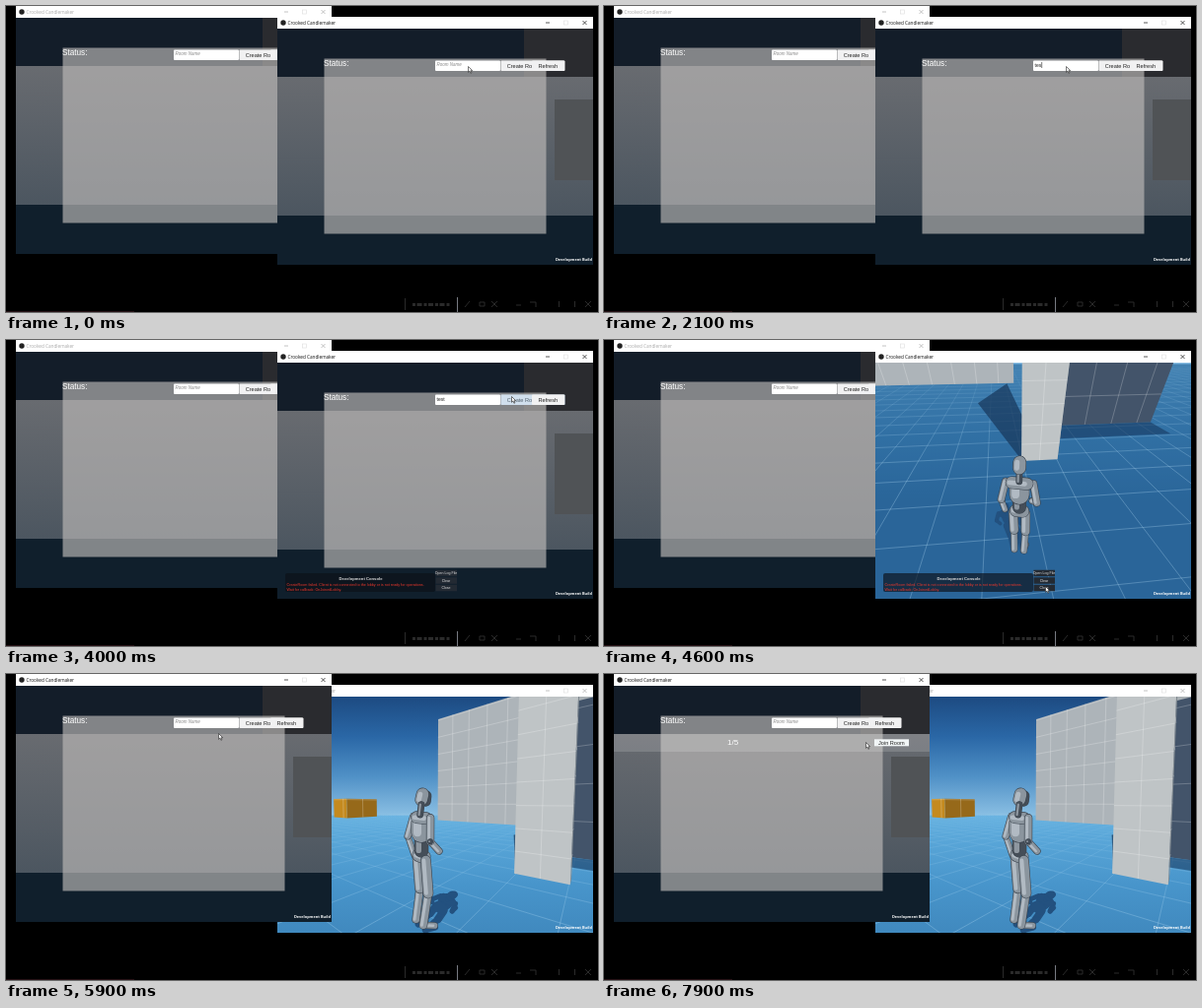
Write an HTML page with a canvas that moves like this. It is 600 px wide and 311 px high and loops after 8 s.

```html
<!DOCTYPE html>
<html lang="en">
<head>
<meta charset="utf-8">
<title>Lobby demo</title>
<style>
  html, body { margin: 0; width: 100%; height: 100%; overflow: hidden; background: #000; }
  #stage { position: relative; width: 600px; height: 311px; overflow: hidden; background: #000; }
  #stage > *, .win > * { position: absolute; left: 0; top: 0; }
  .win { width: 320px; height: 252px; overflow: hidden; color: #111; }
  .win.idle { color: #aaa; }
  #left { left: 10px; top: 0; z-index: 1; }
  #right { left: 275px; top: 11px; z-index: 2; }
  #scene { top: 12px; }
  #cursor { z-index: 9; }
  svg { display: block; }
  text { font-family: "Liberation Sans", Arial, sans-serif; }
  .title { font: 4.7px "Open Sans", sans-serif; fill: currentColor; }
  .build { font: bold 3.9px "Open Sans", sans-serif; fill: #fff; }
  .label { font-size: 5.6px; fill: #222; }
  .hint { font-size: 4.5px; font-style: italic; fill: #888; }
</style>
</head>
<body>
<div id="stage">
  <svg width="600" height="311" fill="none" stroke="#2a2a2a">
    <path d="M404.5 297V309"/>
    <path d="M457.5 296V311" stroke="#777b82"/>
    <path d="M412 303.5H451" stroke-width="3" stroke-dasharray="3 1.5 5 2"/>
    <path d="M465 306l5-6M480 301h5v4h-5zM492 300l6 6M498 300l-6 6M517 304h5M531 301h6v5M560.5 300v6M576.5 300v6M587 300l6 6M593 300l-6 6"/>
    <path d="M0 310.5H130" stroke="#241014"/>
  </svg>

  <div id="left" class="win">
    <svg width="320" height="252">
      <defs>
        <linearGradient id="mid" x2="0" y2="1">
          <stop stop-color="#686b70"/><stop offset="1" stop-color="#4c5660"/>
        </linearGradient>
        <g id="bar">
          <rect width="320" height="12" fill="#fff"/>
          <circle cx="6" cy="6" r="2.7" fill="#222"/>
          <text class="title" x="10.5" y="7.7">Crooked Candlemaker</text>
          <path d="M272 6h4M309.500 4l4 4M313.500 4l-4 4" stroke="currentColor" stroke-width=".7"/>
          <rect x="290.500" y="4" width="4" height="4" fill="none" stroke="#ddd" stroke-width=".6"/>
        </g>
        <g id="lobby">
          <rect y="12" width="320" height="49" fill="#131d29"/>
          <rect x="250" y="12" width="70" height="49" fill="#2a2b2f"/>
          <rect y="61" width="320" height="141" fill="url(#mid)"/>
          <rect x="281" y="84" width="39" height="82" fill="#505356"/>
          <rect y="202" width="320" height="50" fill="#101f2c"/>
          <rect x="47.500" y="42.500" width="225" height="178" fill="#bdbab8" fill-opacity=".66"/>
          <text x="47" y="49.500" font-size="8.200" fill="#fff">Status:</text>
          <rect x="160" y="44.500" width="66" height="10.500" rx="1" fill="#fff"/>
        </g>
        <g id="create">
          <rect x="226.500" y="44.500" width="65" height="10.500" rx="1" fill="#f1f1f2"/>
          <text class="label" x="232.700" y="51.800">Create Room</text>
        </g>
        <g id="refresh">
          <rect x="258" y="44.500" width="33" height="10.500" rx="1" fill="#f1f1f2"/>
          <text class="label" x="264.500" y="51.800">Refresh</text>
        </g>
      </defs>
      <use href="#bar"/>
      <use href="#lobby"/>
      <text class="hint" x="161.500" y="50.200">Room Name</text>
      <use href="#create"/>
      <use href="#refresh"/>
      <rect id="hoverRefresh" x="258" y="44.500" width="33" height="10.500" fill="#234" opacity=".1"/>
      <g id="room">
        <rect y="61" width="320" height="18" fill="#fff" opacity=".15"/>
        <text x="115" y="71.700" font-size="8" fill="#fff">1/5</text>
        <rect x="264" y="66.300" width="35" height="7" fill="#f2f6f7"/>
        <text class="label" x="268" y="71.700">Join Room</text>
      </g>
      <text class="build" x="319" y="248.300" text-anchor="end">Development Build</text>
    </svg>
  </div>

  <div id="right" class="win">
    <canvas id="scene" width="320" height="240"></canvas>
    <svg width="320" height="252">
      <g id="form">
        <use href="#lobby"/>
        <text id="hint" class="hint" x="161.500" y="50.200">Room Name</text>
        <text id="typed" x="161.500" y="50.600" font-size="5" fill="#222"></text>
        <path id="caret" d="M168.700 46v6" stroke="#222" stroke-width=".6"/>
        <use href="#create"/>
        <rect id="hoverCreate" x="226.500" y="44.500" width="65" height="10.500" fill="#9fc4e4" opacity=".4"/>
        <use href="#refresh"/>
      </g>
      <g id="console">
        <rect x="8" y="226" width="152" height="19" rx="2" fill="#0c1018" opacity=".65"/>
        <text x="62.500" y="232.500" font-size="4.200" font-weight="bold" fill="#ddd">Development Console</text>
        <g font-size="3.700" fill="#f0382c">
          <text x="9.500" y="239.200">CreateRoom failed. Client is not connected to the lobby or is not ready for operations.</text>
          <text x="9.500" y="243.700">Wait for callback: OnJoinedLobby.</text>
        </g>
        <g font-size="3.600" fill="#e4e4e4" text-anchor="middle">
          <path d="M160.500 226H182M160.500 233.500H182M160.500 241H182" stroke="#232a33" stroke-width="6.500"/>
          <text x="171" y="227.300">Open Log File</text>
          <text x="171" y="234.800">Clear</text>
          <text x="171" y="242.300">Close</text>
        </g>
      </g>
      <use href="#bar"/>
      <text class="build" x="319" y="248.300" text-anchor="end">Development Build</text>
    </svg>
  </div>

  <svg id="cursor" width="8" height="10">
    <path d="M.5 .5V6.300L1.900 5L2.900 7.300L3.900 6.900L2.900 4.700H4.700Z" fill="#fff" stroke="#222" stroke-width=".6"/>
  </svg>
</div>

<script>
const LOOP = 8000, FOCAL = 208, NEAR = .3, TURN = .25;
const $ = id => document.getElementById(id);
const ctx = $('scene').getContext('2d');
const show = (id, on) => { $(id).style.display = on ? '' : 'none'; };
const mix = (a, b, k) => a + (b - a) * k;
const ease = (t, from, to) => {
  const u = Math.min(1, Math.max(0, (t - from) / (to - from)));
  return u * u * (3 - 2 * u);
};

// Orbit camera around the robot, in metres: x right, y up, z ahead.
let cam;
function aim(yaw, pitch) {
  cam = {
    sy: Math.sin(yaw), cy: Math.cos(yaw), sp: Math.sin(pitch), cp: Math.cos(pitch),
    back: 2.6 * Math.cos(pitch), height: 1.5 + 2.6 * Math.sin(pitch)
  };
}

function toCamera([x, y, z]) {
  const ahead = z * cam.cy - x * cam.sy + cam.back, down = cam.height - y;
  return [x * cam.cy + z * cam.sy, down * cam.cp - ahead * cam.sp, ahead * cam.cp + down * cam.sp];
}

function project(point) {
  const [x, y, depth] = toCamera(point), s = FOCAL / Math.max(depth, NEAR);
  return [421 + x * s, 143 + y * s, s];
}

function trace(points) {
  ctx.beginPath();
  points.forEach(p => ctx.lineTo(...project(p).slice(0, 2)));
}

function poly(fill, points) {
  trace(points);
  ctx.fillStyle = fill;
  ctx.fill();
}

function gradient(y0, y1, ...colours) {
  const g = ctx.createLinearGradient(0, y0, 0, y1);
  colours.forEach((c, i) => g.addColorStop(i / (colours.length - 1), c));
  return g;
}

// Upright tiled wall from (x0, z0) to (x1, z1).
function wall(fill, tile, x0, z0, x1, z1, top, bottom = 0) {
  const at = (k, y) => [mix(x0, x1, k), y, mix(z0, z1, k)];
  const step = tile / Math.hypot(x1 - x0, z1 - z0);
  poly(fill, [at(0, bottom), at(1, bottom), at(1, top), at(0, top)]);
  ctx.strokeStyle = 'rgba(255,255,255,.32)';
  ctx.lineWidth = .7;
  for (let k = step; k < .99; k += step) { trace([at(k, bottom), at(k, top)]); ctx.stroke(); }
  for (let y = bottom + tile; y < top; y += tile) { trace([at(0, y), at(1, y)]); ctx.stroke(); }
}

function floorPatch(fill, x0, z0, x1, z1) {
  poly(fill, [[x0, 0, z0], [x1, 0, z0], [x1, 0, z1], [x0, 0, z1]]);
}

function gridLine(a, b) {
  const da = toCamera(a)[2], db = toCamera(b)[2];
  if (da < NEAR && db < NEAR) return;
  const k = (NEAR - da) / (db - da), cut = a.map((v, i) => mix(v, b[i], k));
  ctx.moveTo(...project(da < NEAR ? cut : a).slice(0, 2));
  ctx.lineTo(...project(db < NEAR ? cut : b).slice(0, 2));
}

function ground(dim) {
  const far = 27 - cam.back;
  const edge = project([-far * cam.sy, 0, far * cam.cy])[1];
  ctx.fillStyle = gradient(edge - 120, edge, '#1d4b82', '#2a67a6', '#4f90c6', '#8abfe3');
  ctx.fillRect(275, 23, 320, 240);
  ctx.fillStyle = gradient(edge, edge + 140, '#62afdf', '#4895cb', '#3d84b9');
  ctx.fillRect(275, edge, 320, 300);
  ctx.fillStyle = `rgba(8,44,92,${dim})`;
  ctx.fillRect(275, edge, 320, 300);

  ctx.beginPath();
  for (let i = -20; i <= 20; i++) {
    gridLine([i + .4, 0, -20], [i + .4, 0, 20]);
    gridLine([-20, 0, i + .3], [20, 0, i + .3]);
  }
  ctx.strokeStyle = gradient(edge, edge + 110, 'rgba(180,220,245,.05)', 'rgba(180,220,245,.38)');
  ctx.lineWidth = .8;
  ctx.stroke();
}

function buildings() {
  wall('#96691a', 2, -18.3, 10, -18.3, 14, 2.1);
  wall('#c48a1f', 2, -21, 10, -18.3, 10, 2.1);
  wall('#adb4b9', 1.55, -9.4, 14.1, 1, 14.1, 9.4);
  poly('rgba(24,56,92,.72)', [[.36, 0, 3.1], [-1.26, 0, 9.1], [.5, 0, 14], [1, 0, 3.1]]);
  floorPatch('rgba(20,52,90,.55)', 1.2, 4.4, 6, 5.6);
  wall('#43546a', 1.1, 1, 5.6, 6, 5.6, 9);
  wall('#a9b0b4', .55, 1.42, 3, 3, 3, 9, 3.6);
  wall('#7f888f', .55, 1.42, 3, 1.42, 3.4, 9);
  wall('#bfc4c6', .53, .36, 3, 1.42, 3, 9);
}

// The robot is a set of capsules: [from, to, width, colour].
function buildRobot() {
  const metal = '#8b959e', dark = '#454e58', parts = [];
  const add = (a, b, width, colour = metal) => parts.push([a, b, width, colour]);
  for (const s of [-1, 1]) {
    const hip = [s * .09, .93, 0], knee = [s * .09, .5, .04], ankle = [s * .08, .1, -.03];
    const shoulder = [s * .18, 1.47, 0], elbow = [s * .24, 1.2, -.05];
    const hand = s < 0 ? [-.22, .93, .04] : [.16, 1.04, .16];
    add(hip, knee, .12);
    add(knee, ankle, .095);
    add(ankle, [s * .1, .04, .14], .075);
    add(shoulder, elbow, .085);
    add(elbow, hand, .07);
    add(knee, knee, .06, dark);
    add(elbow, elbow, .055, dark);
  }
  add([0, 1.22, 0], [0, 1.04, 0], .17, dark);
  add([0, 1.4, 0], [0, 1.27, 0], .25);
  add([-.1, 1.46, 0], [.1, 1.46, 0], .15);
  add([-.05, .97, 0], [.05, .97, 0], .17);
  add([0, 1.5, -.02], [0, 1.63, 0], .07, dark);
  add([0, 1.69, 0], [0, 1.76, .02], .15);
  add([0, 1.67, .07], [0, 1.74, .08], .12, dark);

  const sin = Math.sin(TURN), cos = Math.cos(TURN);
  const turn = ([x, y, z]) => [x * cos + z * sin, y, z * cos - x * sin];
  return parts.map(([a, b, ...look]) => [turn(a), turn(b), ...look]);
}
const robot = buildRobot();

function stroke(a, b, width, colour, shift = 0) {
  const [ax, ay, s] = project(a), [bx, by] = project(b);
  ctx.beginPath();
  ctx.moveTo(ax + shift * s, ay);
  ctx.lineTo(bx + shift * s, by + .01);
  ctx.lineWidth = width * s;
  ctx.strokeStyle = colour;
  ctx.stroke();
}

function drawRobot() {
  ctx.lineCap = 'round';
  const fall = ([x, y, z]) => [x - y * .11, 0, z + y * .62];
  robot.forEach(([a, b, width]) => stroke(fall(a), fall(b), width, '#23517f'));

  const depth = ([a, b]) => toCamera(a)[2] + toCamera(b)[2];
  [...robot].sort((p, q) => depth(q) - depth(p)).forEach(([a, b, width, colour]) => {
    stroke(a, b, width + .014, '#39424c');
    stroke(a, b, width, colour);
    if (a !== b) stroke(a, b, width * .4, 'rgba(215,224,231,.5)', -width * .2);
  });
  ctx.lineCap = 'butt';
}

function drawScene(t) {
  const swing = ease(t, 4700, 5300), settle = ease(t, 5300, 5700);
  ctx.setTransform(1, 0, 0, 1, -275, -23);
  aim(-.1 + .56 * swing + .22 * settle, .63 - .515 * swing - .057 * settle);
  ground(.35 * (1 - swing));
  buildings();
  drawRobot();
}

// Cursor moves: [start, end, x, y].
const moves = [
  [2400, 2850, 512, 57], [4050, 4500, 447, 250], [4700, 5300, 284.5, 97],
  [5300, 5700, 215, 60], [6000, 6600, 287, 48], [7150, 7700, 265, 69]
];

function placeCursor(t) {
  let x = 468, y = 61;
  for (const [from, to, mx, my] of moves) {
    const k = ease(t, from, to);
    x = mix(x, mx, k);
    y = mix(y, my, k);
  }
  $('cursor').style.transform = `translate(${x}px, ${y}px)`;
}

function render(now) {
  const t = now % LOOP, inGame = t >= 4050, leftFront = t >= 5800;
  const letters = Math.min(4, Math.max(0, Math.floor((t - 1590) / 160)));

  $('typed').textContent = 'test'.slice(0, letters);
  show('hint', !letters);
  show('caret', letters === 3);
  show('form', !inGame);
  show('hoverCreate', t >= 2750);
  show('console', t >= 3050 && t < 4750);
  show('hoverRefresh', t >= 6450 && t < 7350);
  show('room', t >= 7200);

  $('left').style.zIndex = leftFront ? 3 : 1;
  $('left').classList.toggle('idle', !leftFront);
  $('right').classList.toggle('idle', leftFront);

  placeCursor(t);
  if (inGame) drawScene(t);
}

const start = performance.now();
function tick() {
  render(performance.now() - start);
  requestAnimationFrame(tick);
}
tick();
</script>
</body>
</html>
```
